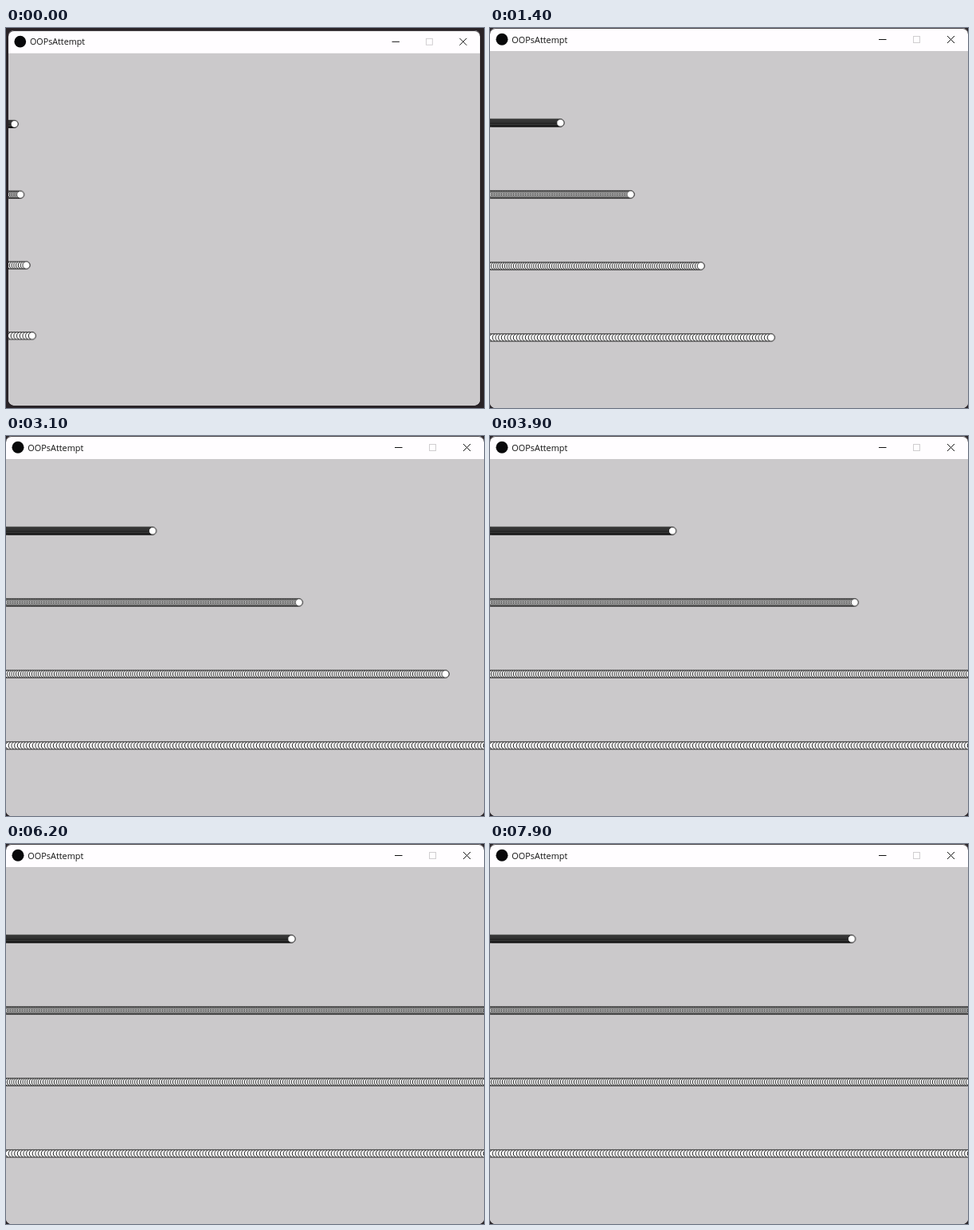
Write an HTML page with a canvas that moves like this. It is 600 px wide and 478 px high and loops after 8 s.

```html
<!DOCTYPE html>
<html lang="en">
<head>
<meta charset="utf-8">
<style>
  html, body { margin: 0; width: 100%; height: 100%; overflow: hidden; background: #292327; }
  #win {
    position: absolute; left: 0; top: 0; width: 600px; height: 478px;
    overflow: hidden; border-radius: 7px; background: #fffdff; transform-origin: 0 0;
    box-shadow: inset 0 1px #4a464a;
  }
  svg { position: absolute; left: 0; top: 0; }
  text { font: 10.9px "Open Sans", "Noto Sans", sans-serif; fill: #111; }
  canvas { position: absolute; left: 0; top: 29px; width: 600px; height: 450px; }
</style>
</head>
<body>
<div id="win">
  <svg width="600" height="29" fill="none" stroke="#111">
    <circle cx="15" cy="14.3" r="7.5" fill="#08080a" stroke="none"/>
    <text x="27.3" y="18.6" stroke="none">OOPsAttempt</text>
    <path d="M488 14.5h9.5M574 10l9 9m0-9l-9 9"/>
    <rect x="531.5" y="10.5" width="8" height="8" stroke="#d0ced0"/>
  </svg>
  <canvas id="view" width="640" height="480"></canvas>
</div>
<script>
const LOOP = 8000, STEP = 100, RADIUS = 5;
const win = document.getElementById('win');
const ctx = document.getElementById('view').getContext('2d');

function drawBall(x, y) {
  ctx.beginPath();
  ctx.arc(x + 0.25, y + 0.35, RADIUS, 0, 2 * Math.PI);
  ctx.fill();
  ctx.stroke();
}

// Each ball moves by its speed per tick and is never erased.
function drawTrails(ticks) {
  ctx.fillStyle = '#cbc9cb';
  ctx.fillRect(0, 0, 640, 480);
  ctx.fillStyle = '#fff';
  ctx.strokeStyle = '#000';
  for (let speed = 1; speed <= 4; speed++) {
    const end = Math.min(ticks * speed, 648);
    for (let x = 0; x <= end; x += speed) drawBall(x, 96 * speed);
  }
}

function render(t) {
  const opening = Math.max(0, 1 - t / 150) ** 2;
  win.style.transform = opening
    ? `translate(${3 * opening}px, ${3 * opening}px) scale(${1 - 0.0133 * opening})`
    : 'none';
  // 60 ticks per second, with a slightly late start
  drawTrails(Math.round(10 + 0.06 * t - 2 * Math.max(0, 1 - t / 900)));
}

const start = performance.now();
let shown = -1;
function frame() {
  const t = Math.floor((performance.now() - start) % LOOP / STEP) * STEP;
  if (t !== shown) render(shown = t);
  requestAnimationFrame(frame);
}
frame();
</script>
</body>
</html>
```
